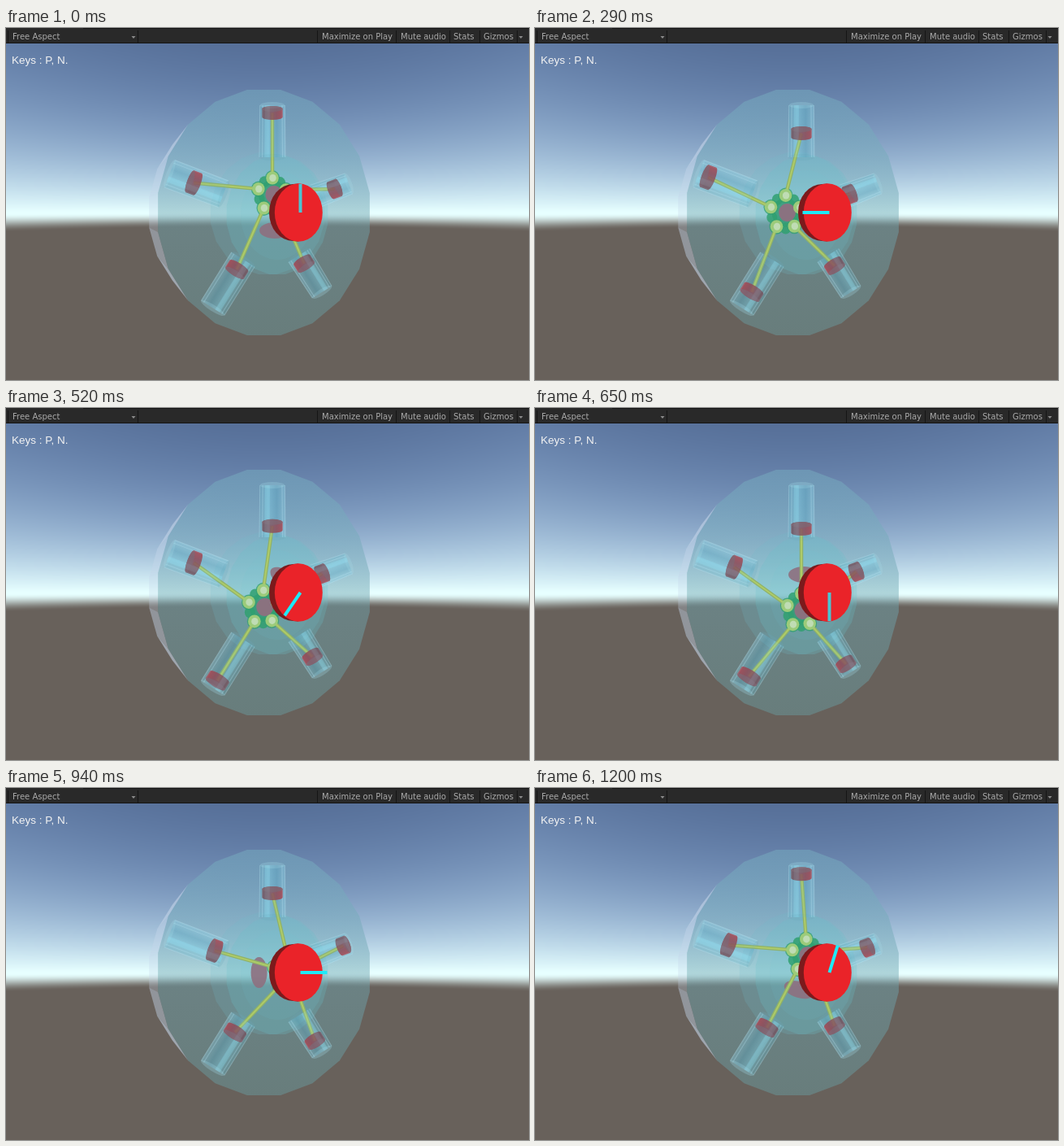
An HTML page with a canvas for the animation above (1300 ms loop, 644 by 433 pixels).

```html
<!DOCTYPE html>
<html>
<head>
<meta charset="utf-8">
<style>
html, body { margin: 0; width: 100%; height: 100%; overflow: hidden; background: #67605a; }
canvas { display: block; }
</style>
</head>
<body>
<canvas id="stage" width="644" height="433"></canvas>
<script>
const W = 644, H = 433, TAU = Math.PI * 2;
const stage = document.getElementById('stage').getContext('2d');
const back = document.createElement('canvas');
back.width = W;
back.height = H;
let g = back.getContext('2d');

function poly(points, fill) {
  g.beginPath();
  points.forEach(p => g.lineTo(p[0], p[1]));
  g.closePath();
  g.fillStyle = fill;
  g.fill();
}

function oval(x, y, rx, ry, fill, turn = 0) {
  g.beginPath();
  g.ellipse(x, y, rx, ry, turn, 0, TAU);
  g.fillStyle = fill;
  g.fill();
}

function line(x0, y0, x1, y1, color, width) {
  g.beginPath();
  g.moveTo(x0, y0);
  g.lineTo(x1, y1);
  g.strokeStyle = color;
  g.lineWidth = width;
  g.stroke();
}

function ramp(x0, y0, x1, y1, ...colors) {
  const r = g.createLinearGradient(x0, y0, x1, y1);
  colors.forEach((c, i) => r.addColorStop(i / (colors.length - 1), c));
  return r;
}

// Engine plane to screen: the left side is nearer to the viewer
function project(x, y) {
  const near = 1 / (1 + 0.00117 * x);
  return { x: 328 + 0.86 * x * near, y: 227 - y * near, near };
}

// 20-sided rim of a round part seen at an angle
function rim(x, y, rx, ry) {
  return Array.from({ length: 20 }, (_, i) => {
    const a = (i + 0.5) * TAU / 20;
    return [x + rx * Math.cos(a), y - ry * Math.sin(a)];
  });
}

// Channels: zenith, horizon, ground, falloff with height
const channels = [[72, 231, 104, .24], [92, 255, 97, .27], [120, 255, 91, .4]];

function skyColor(slope, [top, glow, ground, fall]) {
  if (slope > 0) return top + (glow - top) * Math.exp(-slope / fall);
  const k = Math.min(1, Math.max(0, (-slope - .005) / .047));
  return glow + (ground - glow) * k * k * (3 - 2 * k);
}

function paintSky() {
  const img = g.createImageData(W, H);
  for (let y = 0, o = 0; y < H; y++) {
    for (let x = 0; x < W; x++) {
      const slope = (225.5 - y) / Math.hypot(359, x - 322);
      for (const c of channels) img.data[o++] = skyColor(slope, c);
      img.data[o++] = 255;
    }
  }
  g.putImageData(img, 0, 0);
}

function paintBar() {
  g.fillStyle = '#292929';
  g.fillRect(0, 0, W, 18);
  g.fillStyle = '#151515';
  g.fillRect(95, 0, W, 1);
  g.fillRect(0, 18, W, 1);
  for (const x of [2, 162, 383, 480, 546, 583, 629]) g.fillRect(x, 3, 1, 15);
  g.fillStyle = '#aaa';
  g.font = '10px "DejaVu Sans", sans-serif';
  [['Free Aspect', 8], ['Maximize on Play', 389], ['Mute audio', 486], ['Stats', 551], ['Gizmos', 588]]
    .forEach(([s, x]) => g.fillText(s, x, 14));
  for (const x of [157, 634]) poly([[x - 2.5, 10], [x + 2.5, 10], [x, 13]], '#8c8c8c');
  g.fillStyle = '#f2f2f2';
  g.font = '13.5px "Liberation Sans", Arial, sans-serif';
  g.fillText('Keys : P, N.', 7, 44);
}

function paintHousing() {
  const front = rim(317.5, 227, 132, 153), rear = rim(277, 227, 102, 118);
  for (let k = 7; k < 12; k++) {
    const a = .3 + .15 * Math.abs(k - 9);
    poly([front[k], front[k + 1], rear[k + 1], rear[k]], `rgba(196,212,232,${a})`);
  }
  poly(front, ramp(0, 74, 0, 380, 'rgba(120,176,194,.48)', 'rgba(104,156,160,.48)'));
  poly(rim(322, 228, 71, 76), 'rgba(110,185,198,.2)');
  poly(rim(334, 230, 63, 74), 'rgba(105,190,200,.25)');
  oval(334, 230, 45, 55, 'rgba(110,190,200,.1)');
}

const arms = Array.from({ length: 5 }, (_, i) => {
  const a = TAU * (.25 + i / 5), dx = Math.cos(a), dy = Math.sin(a);
  const outer = project(132 * dx, 132 * dy), inner = project(68 * dx, 68 * dy);
  return {
    dx, dy, outer, inner,
    angle: Math.atan2(inner.y - outer.y, inner.x - outer.x),
    length: Math.hypot(inner.x - outer.x, inner.y - outer.y)
  };
});

function along(angle, x, y, paint) {
  g.save();
  g.translate(x, y);
  g.rotate(angle);
  paint();
  g.restore();
}

function paintTube({ outer, inner, angle, length }, alpha) {
  const w0 = 15.3 * outer.near, w1 = 16 * inner.near;
  const band = (a, b, fill) => poly([[0, a * w0], [length, a * w1], [length, b * w1], [0, b * w0]], fill);
  along(angle, outer.x, outer.y, () => {
    g.globalAlpha = alpha;
    band(-1, 1, ramp(0, -w1, 0, w1, 'rgba(150,215,235,.35)', 'rgba(90,170,198,.4)', 'rgba(130,210,232,.45)', 'rgba(100,180,200,.25)'));
    band(.2, .6, 'rgba(150,228,246,.28)');
    oval(0, 0, 4, w0, 'rgba(165,215,230,.28)');
    oval(length, 0, 4, w1, 'rgba(110,170,190,.2)');
    for (const s of [-1, -.78, .78, 1]) line(0, s * w0, length, s * w1, 'rgba(185,228,240,.35)', 1);
  });
}

function paintPiston({ x, y, near }, { angle }) {
  const w = 12.7 * near, h = 5;
  along(angle, x, y, () => {
    g.beginPath();
    g.ellipse(h, 0, 3.5, w, 0, -TAU / 4, TAU / 4);
    g.ellipse(-h, 0, 3.5, w, 0, TAU / 4, TAU * .75);
    g.closePath();
    g.fillStyle = ramp(0, -w, 0, w, 'rgba(172,52,62,.85)', 'rgba(140,66,76,.85)', 'rgba(112,70,80,.85)');
    g.fill();
    oval(-h, 0, 3.5, w, 'rgba(130,92,104,.8)');
  });
}

function paintDisc(c, s) {
  oval(353.5, 227, 29.5, 35, '#7c1a1c');
  poly([[353.5, 192], [360, 191.5], [360, 262.5], [353.5, 262]], '#7c1a1c');
  oval(360.3, 227, 29.5, 35.7, '#ea2329');
  line(362.5, 227, 362.5 - 33 * s, 227 - 35 * c, Math.abs(s) < .1 ? '#4cc4d2' : '#1eeaf8', 4);
}

function draw(turn) {
  const c = Math.cos(turn), s = Math.sin(turn);
  const cx = -22 * s, cy = 22 * c, rod = 80, hub = 20.5;
  const crank = project(cx, cy), weight = project(-cx, -cy);
  const pins = arms.map(({ dx, dy }) => project(cx + hub * dx, cy + hub * dy));
  // Each rod end slides along its own cylinder axis
  const heads = arms.map(({ dx, dy }) => {
    const side = cx * dy - cy * dx;
    const reach = hub + cx * dx + cy * dy + Math.sqrt(rod * rod - side * side);
    return project(reach * dx, reach * dy);
  });

  g.drawImage(back, 0, 0);
  oval(weight.x + 3, weight.y, 19, 10, 'rgba(142,112,128,.9)', -turn);
  oval(crank.x, crank.y, 17, 18, 'rgba(52,155,118,.85)');
  arms.forEach(({ dx, dy }, i) => {
    const gap = project(cx - 19 * dx, cy - 19 * dy);
    oval(gap.x, gap.y, 6.5, 7, 'rgba(48,160,112,.85)');
    oval(pins[i].x, pins[i].y, 9, 9.5, 'rgba(52,160,112,.8)');
  });
  oval(crank.x + 2, crank.y, 10.5, 11, 'rgba(142,112,128,.95)');
  pins.forEach((p, i) => {
    line(p.x, p.y, heads[i].x, heads[i].y, '#90b268', 4.5);
    line(p.x, p.y, heads[i].x, heads[i].y, '#aecb68', 2);
  });
  heads.forEach((p, i) => paintPiston(p, arms[i]));
  arms.forEach(arm => paintTube(arm, .3));
  pins.forEach(({ x, y }) => {
    oval(x, y, 7.8, 8, '#9ccb7a');
    oval(x + .5, y, 4.2, 4.5, '#bfdcb4');
  });
  paintDisc(c, s);
}

paintSky();
paintHousing();
arms.forEach(arm => paintTube(arm, .75));
paintBar();
g = stage;

const holds = [30, 100, 30, 30, 100, 100, 30, 100, 30, 100];

function tick(now) {
  const t = now % 1300;
  let rest = t % 650, step = t < 650 ? 0 : 10;
  while (rest >= holds[step % 10]) rest -= holds[step++ % 10];
  draw(step * TAU / 20);
  requestAnimationFrame(tick);
}
tick(0);
</script>
</body>
</html>
```
